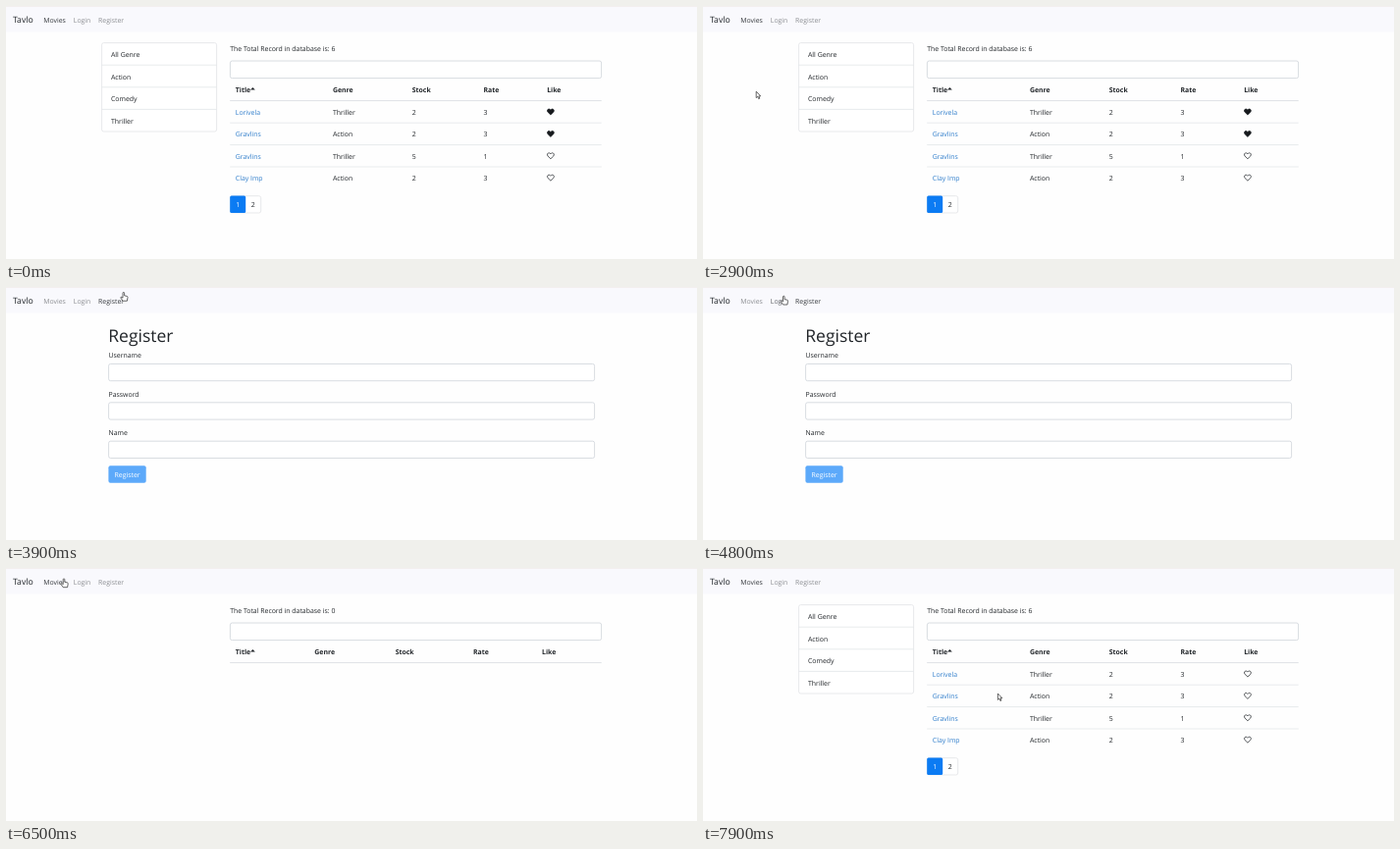
Write an HTML page that moves like this. It is 704 px wide and 258 px high and loops after 8 s.

```html
<!DOCTYPE html>
<html lang="en">
<head>
<meta charset="utf-8">
<title>Movie catalogue</title>
<style>
  html, body { margin: 0; width: 100%; height: 100%; overflow: hidden; background: #fefefe; }
  svg { display: block; width: 100%; height: 100%; }
  text { font: 6.92px "Open Sans", "Noto Sans", sans-serif; fill: #212529; text-rendering: geometricPrecision; white-space: pre; }
  .brand { font-size: 8.7px; }
  .title { font-size: 17.5px; font-weight: 500; }
  .bold { font-weight: 700; }
  .link { fill: #2f7dcb; }
  .white { fill: #fff; }
  .mid { text-anchor: middle; }
  .field { fill: #fff; stroke: #ced4da; stroke-width: .8; }
  .panel { fill: #fff; stroke: #dfe0e2; stroke-width: .7; }
  .rule { stroke: #dee2e6; stroke-width: .7; }
  .pointer { fill: #fff; stroke: #333; stroke-width: .75; stroke-linejoin: round; }
</style>
</head>
<body>
<svg id="stage" viewBox="0 0 704 258"></svg>
<script>
const LOOP = 8000, STEP = 100;
const stage = document.getElementById("stage");

const navLinks = [
  { name: "Movies", x: 38.2, from: 34.5, to: 65 },
  { name: "Login", x: 68.8, from: 65, to: 90.5 },
  { name: "Register", x: 94, from: 90.5, to: 124 },
];
const genres = ["All Genre", "Action", "Comedy", "Thriller"];
const headers = ["Title", "Genre", "Stock", "Rate", "Like"];
const movies = [
  ["Lorivela", "Thriller", 2, 3],
  ["Gravlins", "Action", 2, 3],
  ["Gravlins", "Thriller", 5, 1],
  ["Clay Imp", "Action", 2, 3],
];
const fullColumns = [233.8, 333, 413.8, 486.5, 551.2];
const emptyColumns = [233.8, 314.3, 396.7, 476, 546];

// Pointer path: time, x, y of the tip
const path = [
  [2900, 54.2, 87.2], [3400, 119.8, 5.4],
  [4400, 119.8, 5.4], [4800, 82.3, 9.2],
  [5400, 82.3, 9.2], [5900, 59, 10.9],
  [6600, 59, 10.9], [7200, 351, 127], [7500, 330, 132], [7900, 300.4, 128],
];

const text = (x, y, value, cls = "") => `<text x="${x}" y="${y}" class="${cls}">${value}</text>`;
const box = (x, y, w, h, cls, r = 2) =>
  `<rect x="${x}" y="${y}" width="${w}" height="${h}" rx="${r}" class="${cls}"/>`;
const fill = (x, y, w, h, color, r = 0) =>
  `<rect x="${x}" y="${y}" width="${w}" height="${h}" rx="${r}" fill="${color}"/>`;
const rule = (x1, x2, y, width = .7) =>
  `<path class="rule" style="stroke-width:${width}" d="M${x1} ${y}H${x2}"/>`;

function pointerAt(t) {
  if (t < path[0][0]) return null;
  const i = path.findIndex(key => key[0] >= t);
  if (i < 1) return path.at(i).slice(1);
  const [t0, x0, y0] = path[i - 1], [t1, x1, y1] = path[i];
  const p = (t - t0) / (t1 - t0), e = p * p * (3 - 2 * p);
  return [x0 + (x1 - x0) * e, y0 + (y1 - y0) * e];
}

const hovered = p => p && p[1] > 4 && p[1] < 23 && navLinks.find(l => p[0] >= l.from && p[0] < l.to);

function pointer(p) {
  const hand = "M-.8 5V.8Q-.8 0 0 0T.8 .8V3.4L3.5 4Q4.3 4.2 4.2 5.2L3.6 8.8H-.8L-3 5.6Q-2.8 4.2-1.8 5L-.8 5.8Z";
  const arrow = "M0 0V6.4L1.5 5.1 2.5 7.5 3.6 7 2.6 4.7H4.5Z";
  return `<path class="pointer" transform="translate(${p})" d="${hovered(p) ? hand : arrow}"/>`;
}

function navbar(active, hover) {
  const links = navLinks.map(link => {
    const alpha = link.name === active ? .9 : link === hover ? .7 : .5;
    return `<g opacity="${alpha}">${text(link.x, 16.6, link.name)}</g>`;
  });
  return fill(0, 0, 704, 26.5, "#f9f9fd") + fill(0, 0, 704, 1, "#f3efef") +
    text(7, 17.3, "Tavlo", "brand") + links.join("");
}

function heart(x, y, liked) {
  return `<path transform="translate(${x} ${y})" fill="${liked ? "#16191c" : "none"}" stroke="#212529"
    stroke-width=".75" d="M3.7 6.3L.9 3.6C-.5 2 .7 .2 2 .3 2.8 .3 3.3 .8 3.7 1.4 4.1 .8 4.6 .3 5.4 .3 6.7 .2 7.9 2 6.5 3.6Z"/>`;
}

function catalogue(loaded, liked) {
  const columns = loaded ? fullColumns : emptyColumns;
  let out = text(228.2, 46.1, `The Total Record in database is: ${loaded ? 6 : 0}`) +
    box(228.4, 56, 378.2, 17.6, "field") +
    headers.map((h, i) => text(columns[i], 88, h, "bold")).join("") +
    `<path d="M249 85.6L251.4 83 253.8 85.6Z" fill="#212529"/>` +
    rule(228.2, 606.7, 96.6, 1);
  if (!loaded) return out;

  out += box(97.6, 37.6, 117, 90.4, "panel");
  genres.forEach((genre, i) => {
    const y = 37.6 + i * 22.6;
    if (i) out += rule(97.6, 214.6, y);
    out += text(107, y + 14.4, genre);
  });
  movies.forEach((movie, row) => {
    const y = 110.7 + row * 22.4;
    if (row) out += rule(228.2, 606.7, y - 13.9);
    movie.forEach((value, i) => out += text(columns[i], y, value, i ? "" : "link"));
    out += heart(columns[4], y - 6, row < liked);
  });
  return out + box(228.4, 193.7, 31.3, 17.3, "panel") + fill(228.2, 193.5, 16, 17.6, "#0b7bf3", 1.5) +
    text(236.2, 205.2, 1, "white mid") + text(251.8, 205.2, 2, "mid");
}

function form(title, labels, button, width) {
  const fields = labels.map((label, i) => {
    const y = 78.4 + i * 39.4;
    return text(104.5, y - 6.3, label) + box(104.6, y, 495, 17.3, "field");
  });
  const y = 64 + labels.length * 39.4;
  return text(104.3, 55.8, title, "title") + fields.join("") +
    fill(104.4, y, width, 17.6, "#5ca9fa", 2) + text(104.4 + width / 2, y + 11.3, button, "white mid");
}

function page(t) {
  if (t < 3900) return ["Movies", catalogue(true, 2)];
  if (t < 5300) return ["Register", form("Register", ["Username", "Password", "Name"], "Register", 38.3)];
  if (t < 6500) return ["Login", form("Login", ["Username", "Password"], "Submit", 35)];
  return ["Movies", catalogue(t >= 7600, 0)];
}

let shown = -1;
function draw(now) {
  const t = Math.floor(now % LOOP / STEP) * STEP;
  if (t !== shown) {
    shown = t;
    const [active, content] = page(t), p = pointerAt(t);
    stage.innerHTML = navbar(active, hovered(p)) + content + (p ? pointer(p) : "");
  }
  requestAnimationFrame(draw);
}
draw(0);
</script>
</body>
</html>
```
